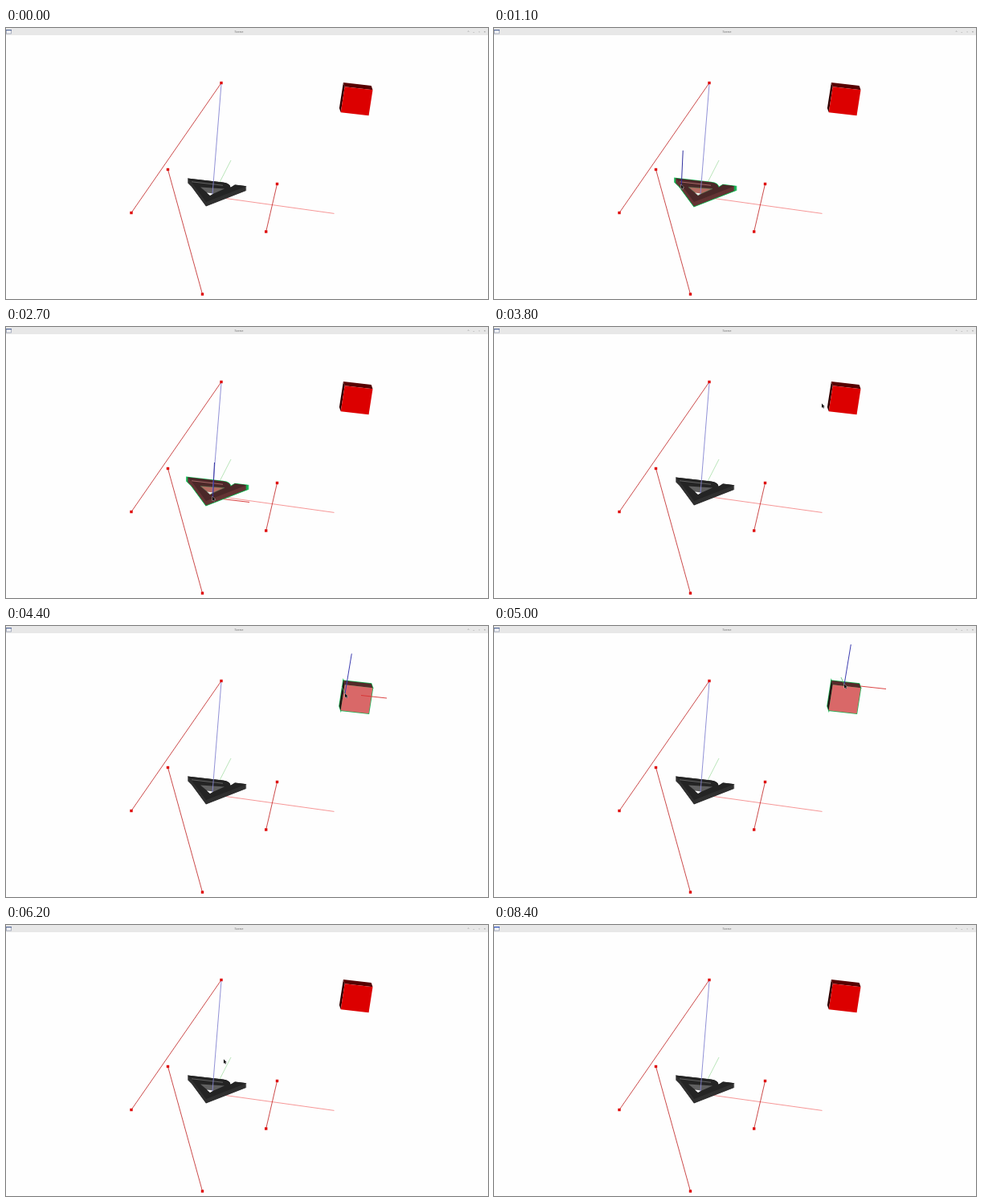
These frames come from a looping animation (600 by 338 pixels, 8500 ms). An HTML page with a canvas:

```html
<!DOCTYPE html>
<html lang="en">
<head>
<meta charset="utf-8">
<title>3D viewer</title>
<style>
html, body { margin: 0; width: 100%; height: 100%; overflow: hidden; background: #fefefe; }
canvas { display: block; width: 600px; height: 338px; }
</style>
</head>
<body>
<canvas id="view" width="600" height="338"></canvas>
<script>
const ctx = document.getElementById('view').getContext('2d');
const LOOP = 8500, STEP = 100;

// Pointer stops: time, x, y
const stops = [
  [100, 101, 329], [800, 230, 192], [2000, 241, 207], [2700, 257, 212],
  [3800, 408, 96], [5000, 436, 73], [5400, 298, 169], [5800, 262, 200],
  [6200, 271, 168], [7100, 23, 250]
];

// Flat profile of the dark solid, swept downwards by its thickness
const profile = new Path2D(
  'M226 187.5L270 192.5Q279 193.5 279.5 199L285 195.5L299.5 197.3L249 217L231 192.5Z');
const hole = new Path2D('M242 198.5L272 200.5L254 208.5Z');
const gap = new Path2D('M250 205.5L258 206.5L254 209Z');
const THICK = 5.5;

// Block: front corner, its two edges and the offset to the back
const block = { x: 421.7, y: 73.3, a: [34.8, 4], b: [-5, 32], d: [-1.8, -5.3] };

// Parallelogram at a corner, spanned by two edges
function span({ x, y }, u, v) {
  const s = new Path2D();
  s.moveTo(x, y);
  s.lineTo(x + u[0], y + u[1]);
  s.lineTo(x + u[0] + v[0], y + u[1] + v[1]);
  s.lineTo(x + v[0], y + v[1]);
  s.closePath();
  return s;
}
const front = span(block, block.a, block.b);
const topFace = span(block, block.a, block.d);
const leftFace = span(block, block.b, block.d);

function fill(s, color) {
  ctx.fillStyle = color;
  ctx.fill(s);
}

function stroke(s, color, width) {
  ctx.strokeStyle = color;
  ctx.lineWidth = width;
  ctx.stroke(s);
}

function line(x, y, dx, dy, color, width = 0.9) {
  const s = new Path2D();
  s.moveTo(x, y);
  s.lineTo(x + dx, y + dy);
  stroke(s, color, width);
}

function sweep(paint) {
  for (let h = THICK; h >= 0; h -= 0.5) {
    ctx.save();
    ctx.translate(0, h);
    paint();
    ctx.restore();
  }
}

function pointerAt(t) {
  const i = stops.findIndex(k => k[0] > t);
  if (i < 1) return null;
  const [t0, x0, y0] = stops[i - 1], [t1, x1, y1] = stops[i];
  const u = (t - t0) / (t1 - t0);
  return { x: x0 + (x1 - x0) * u, y: y0 + (y1 - y0) * u };
}

function drawWindow(t) {
  ctx.fillStyle = '#fefefe';
  ctx.fillRect(0, 0, 600, 338);
  ctx.fillStyle = '#e8e8e8';
  ctx.fillRect(0, 0, 600, 9);

  ctx.fillStyle = '#f6f6f8';
  ctx.fillRect(0, 2, 7, 5);
  ctx.strokeStyle = '#8a93a8';
  ctx.lineWidth = 0.7;
  ctx.strokeRect(0.5, 2.5, 6, 4.5);
  ctx.fillStyle = t >= 8300 ? '#3458c0' : '#5b6f9c';
  ctx.fillRect(0, 2, 7, 1.3);

  ctx.fillStyle = '#666';
  ctx.font = '4px "Open Sans", sans-serif';
  ctx.textAlign = 'center';
  ctx.fillText('Scene', 290, 6.2);
  ['^', '–', '▫', '×'].forEach((c, i) => ctx.fillText(c, 575.5 + i * 6.8, 6.2));
}

function drawEdge(x, y, dx, dy) {
  line(x, y, dx, dy, '#c22a2a', 0.85);
  ctx.fillStyle = '#df0808';
  for (const k of [0, 1]) ctx.fillRect(x + dx * k - 1.7, y + dy * k - 1.7, 3.4, 3.4);
}

function drawSolid(hot) {
  if (hot) sweep(() => stroke(profile, '#12b552', 1.6));
  sweep(() => fill(profile, hot ? '#643434' : '#303030'));
  fill(profile, hot ? '#4b2828' : '#242424');
  fill(hole, hot ? '#b56c62' : '#606060');
  fill(gap, '#fefefe');
  if (hot) stroke(hole, '#3f7f50', 0.5);
  line(231, 191.8, 39, 4.4, hot ? '#a76767' : '#626262', 1.1);
}

function drawBlock(hot) {
  const faces = [leftFace, topFace, front];
  const colors = hot ? ['#271616', '#542a2a', '#d96868'] : ['#300000', '#570000', '#dc0000'];
  if (hot) faces.forEach(f => stroke(f, '#12b552', 1.4));
  faces.forEach((f, i) => fill(f, colors[i]));
}

function drawPointer({ x, y }) {
  const arrow = new Path2D(`M${x} ${y - 0.5}v5.2l1.2 -1.1l.8 1.8l.9 -.4l-.8 -1.7l1.5 -.1z`);
  stroke(arrow, '#ddd', 0.7);
  fill(arrow, '#111');
}

function draw(t) {
  drawWindow(t);
  const p = pointerAt(t);
  const over = s => p !== null && ctx.isPointInPath(s, p.x, p.y);
  const onBlock = [leftFace, topFace, front].some(over);
  const onSolid = p !== null &&
    [0, THICK].some(h => ctx.isPointInPath(profile, p.x, p.y - h));

  line(257, 210, 23, -45, '#a9dfa9', 0.8);
  line(257, 210.2, 151.5, 21.2, '#f58c8c');
  drawEdge(268, 68.5, -112, 162);
  drawEdge(201.5, 176.5, 43, 155.5);
  drawEdge(337.5, 194.5, -13.8, 59.5);

  if (onSolid) line(p.x, p.y + 1, 46, 5.5, '#d52b2b');
  drawSolid(onSolid);
  line(268, 70, -11, 137, '#8585d2');
  drawBlock(onBlock);

  if (onSolid) line(p.x + 0.5, p.y + 1, 2, -44, '#3030a0', 1);
  if (onBlock) {
    line(p.x, p.y, -4, -9, '#49b96d', 0.8);
    line(p.x + 20, p.y + 2, 32, 3.5, '#d83030');
    line(p.x, p.y, 8.3, -50, '#3c3cb0', 1);
  }
  if (p) drawPointer(p);
}

function tick(now) {
  draw(Math.floor(now % LOOP / STEP) * STEP);
  requestAnimationFrame(tick);
}
draw(0);
requestAnimationFrame(tick);
</script>
</body>
</html>
```
